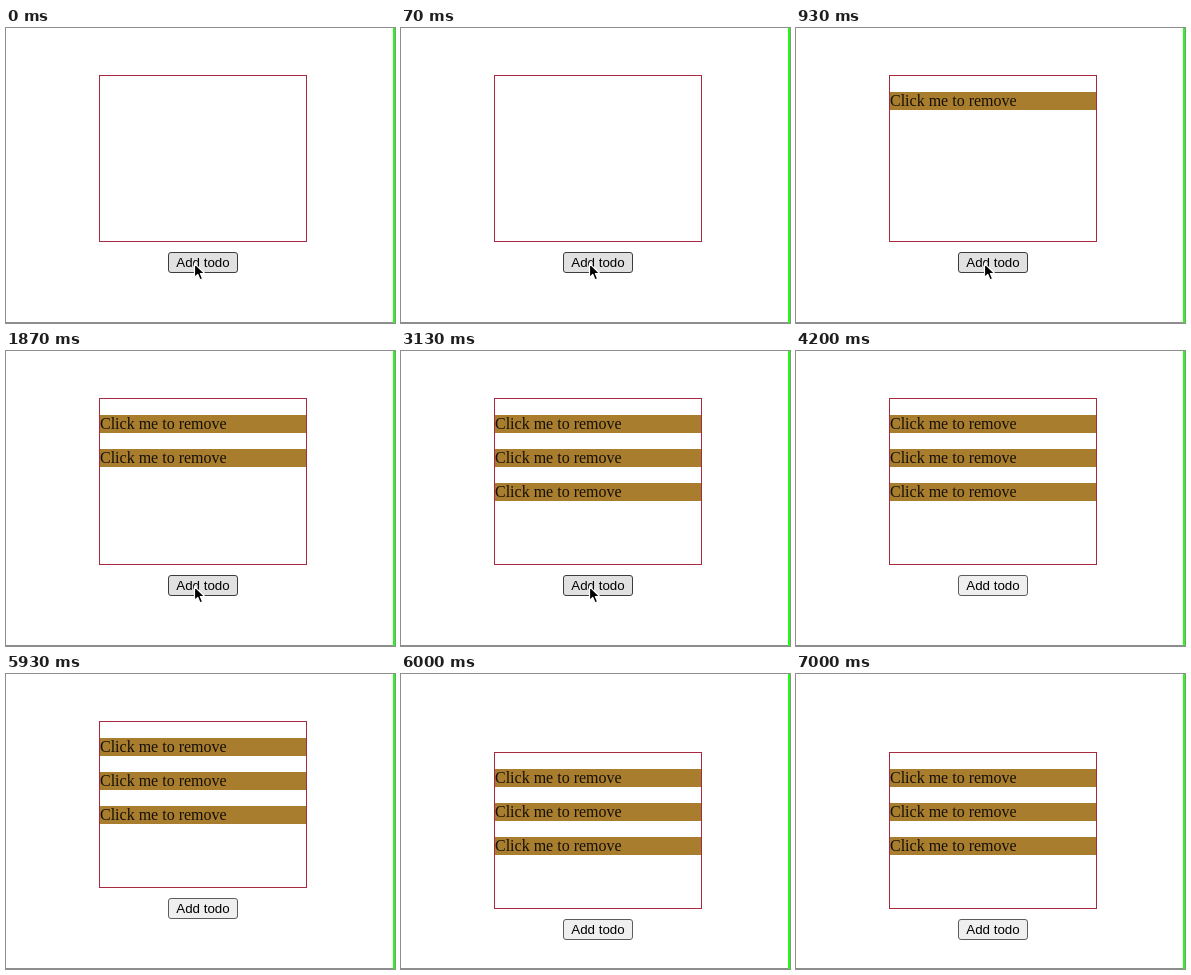
An HTML page that plays this animation: 389x295 px, repeating every 7540 ms.

```html
<!DOCTYPE html>
<html lang="en">
<head>
<meta charset="utf-8">
<title>Todo list</title>
<style>
  html, body { margin: 0; width: 100%; height: 100%; overflow: hidden; background: #fff; }
  * { box-sizing: border-box; }
  .stage { position: relative; width: 389px; height: 295px; overflow: hidden; }
  .stage > * { position: absolute; }
  .list, .item, .add, .cursor { animation: 7540ms step-end infinite; }

  .list {
    left: 93px; top: 47px; width: 208px; height: 167px;
    border: 1px solid #a82a40;
    animation-name: resize;
  }
  .item {
    height: 18px; margin: 16px 0;
    font: 16px/18px "Liberation Serif", Times, serif;
    color: #15100a; background: #a87d2d;
    white-space: nowrap;
  }
  .item:nth-child(1) { animation-name: first; }
  .item:nth-child(2) { animation-name: second; }
  .item:nth-child(3) { animation-name: third; }

  .add {
    left: 162px; top: 224px; width: 70px; height: 21px;
    border: 1px solid #5c5c5c; border-radius: 3px;
    font: 13.333px/19px "Liberation Sans", Arial, sans-serif;
    text-align: center; white-space: nowrap; color: #000;
    background: #efefef;
    animation-name: button;
  }
  .cursor { left: 187px; top: 234px; animation-name: leave; }
  .edge { right: 0; top: 0; width: 2px; height: 295px; background: #1dff0c; }
  .floor { left: 0; bottom: 0; width: 387px; height: 1px; background: #8c8c8c; }

  /* Percentages are the event times over the 7540 ms loop. */
  @keyframes first  { 0% { visibility: hidden } 11.538%, 100% { visibility: visible } }
  @keyframes second { 0% { visibility: hidden } 24.801%, 100% { visibility: visible } }
  @keyframes third  { 0% { visibility: hidden } 41.512%, 100% { visibility: visible } }
  @keyframes resize {
    0% { top: 47px; height: 167px }
    79.576%, 100% { top: 78px; height: 157px }
  }
  @keyframes button {
    0% { top: 224px; background: #e1e1e1; border-color: #3c3c3c }
    46.021% { top: 224px; background: #efefef; border-color: #5c5c5c }
    79.576%, 100% { top: 245px; background: #efefef; border-color: #5c5c5c }
  }
  @keyframes leave {
    0% { transform: none; visibility: visible }
    46.021% { transform: translate(36px, 30px); visibility: visible }
    46.817%, 100% { transform: none; visibility: hidden }
  }
</style>
</head>
<body>
<div class="stage">
  <div class="list">
    <div class="item">Click me to remove</div>
    <div class="item">Click me to remove</div>
    <div class="item">Click me to remove</div>
  </div>
  <div class="add">Add todo</div>
  <div class="edge"></div>
  <div class="floor"></div>
  <svg class="cursor" width="14" height="20" viewBox="0 0 14 20">
    <path d="M1.5 1.5V15.5L4.8 12.4L7 17.8L9.6 16.7L7.4 11.5H11.7Z"
          fill="#000" stroke="#fff" stroke-width="1.2" stroke-linejoin="round"/>
  </svg>
</div>
</body>
</html>
```
